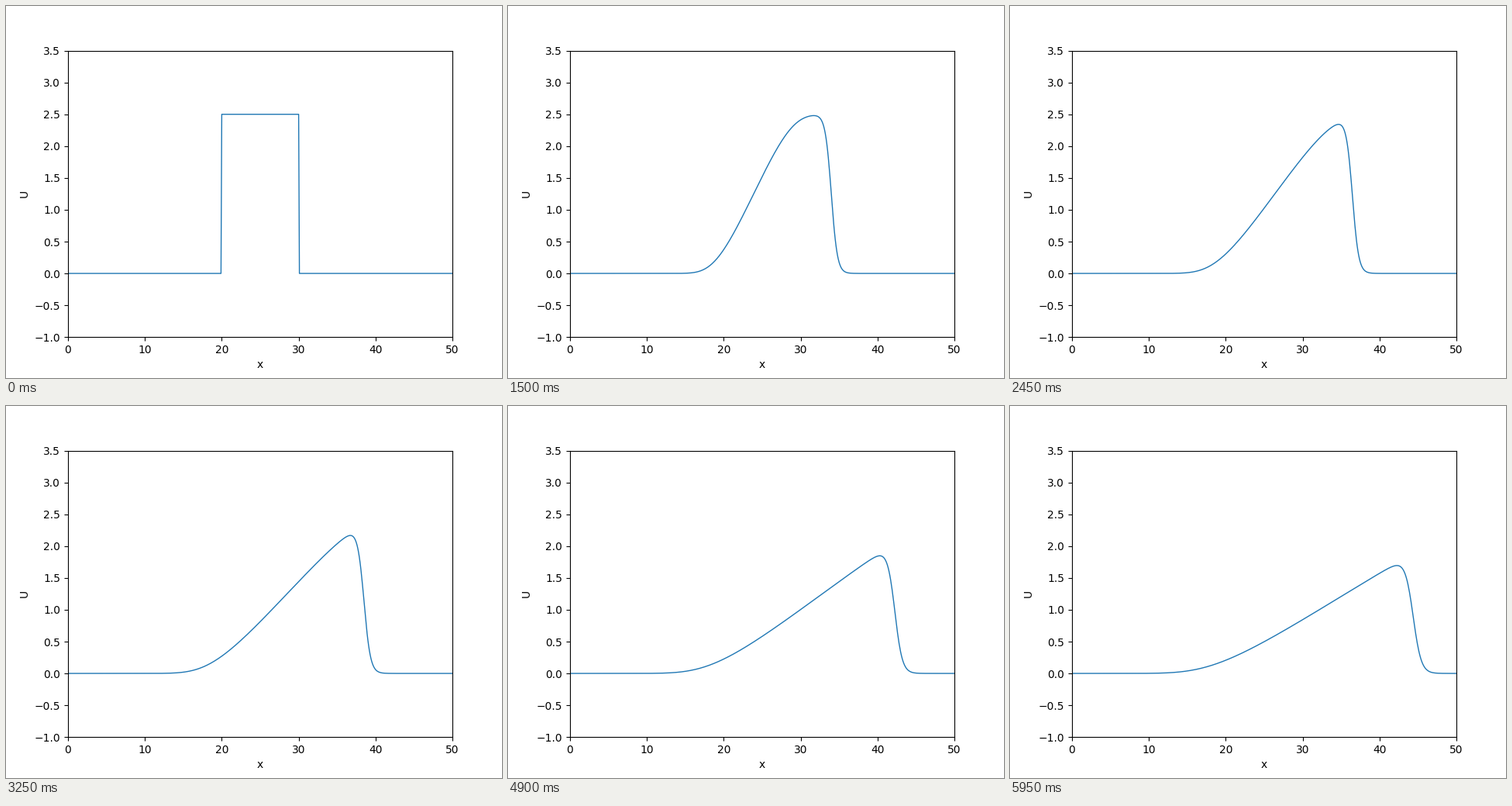
Write a matplotlib script that moves like this. It is 640 px wide and 480 px high and loops after 6000 ms.

```python
import math

import numpy as np
import matplotlib.pyplot as plt
from matplotlib.animation import FuncAnimation

FRAMES = 120
INTERVAL = 50     # ms
DT = 0.105        # simulated time per frame
NU = 0.5          # viscosity
HEIGHT = 2.5      # height of the starting pulse
LEFT, RIGHT = 19.95, 30.05

erfc = np.vectorize(math.erfc)
x = np.linspace(0, 50, 501)


def burgers(t):
    """Viscous Burgers flow from a square pulse (Cole-Hopf solution)."""
    if t == 0:
        return np.where((x > LEFT) & (x < RIGHT), HEIGHT, 0.0)
    s = math.sqrt(4 * NU * t)
    shift = HEIGHT * t
    before = erfc((x - LEFT) / s)
    inside = np.exp((HEIGHT * shift / 2 - HEIGHT * (x - LEFT)) / (2 * NU)) * (
        erfc((LEFT + shift - x) / s) - erfc((RIGHT + shift - x) / s))
    after = math.exp(-HEIGHT * (RIGHT - LEFT) / (2 * NU)) * erfc((RIGHT - x) / s)
    return HEIGHT * inside / (before + inside + after)


plt.rcParams["font.family"] = "DejaVu Sans"
fig, ax = plt.subplots(figsize=(6.4, 4.8), dpi=100)
ax.set(xlim=(0, 50), ylim=(-1, 3.5), xlabel="x", ylabel="U")
line, = ax.plot(x, burgers(0), color="tab:blue", linewidth=1)


def update(i):
    line.set_ydata(burgers(i * DT))
    return line,


anim = FuncAnimation(fig, update, frames=FRAMES, interval=INTERVAL,
                     repeat=True, repeat_delay=0)
plt.show()
```
